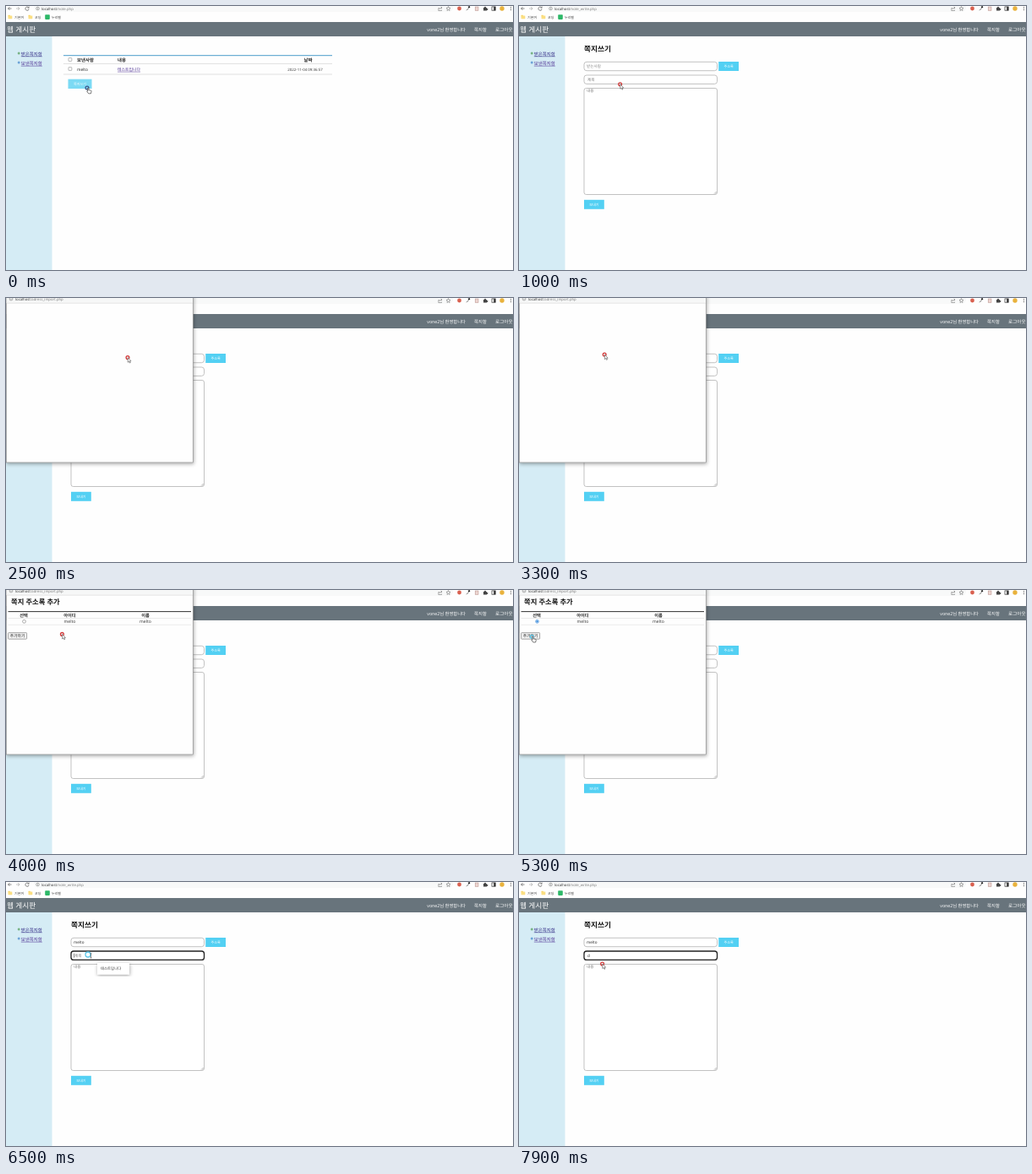
Animation of 600 by 313 pixels, one loop 8000 ms. Source, as an HTML page:

```html
<!DOCTYPE html>
<html lang="ko">
<head>
<meta charset="utf-8">
<title>웹 게시판</title>
<style>
html, body { margin: 0; width: 100%; height: 100%; overflow: hidden; background: #fff; }
svg { display: block; width: 100vw; height: 100vh; }
text {
  font-family: "Open Sans", "Noto Sans CJK KR", "Noto Sans CJK", sans-serif;
  text-rendering: geometricPrecision;
  white-space: pre;
}
</style>
</head>
<body>
<svg id="stage" viewBox="0 0 600 313">
  <defs>
    <filter id="shade" x="-10%" y="-10%" width="125%" height="125%">
      <feDropShadow dx="0.5" dy="1.5" stdDeviation="2" flood-color="#000" flood-opacity=".35"/>
    </filter>
  </defs>
</svg>
<script>
const NS = 'http://www.w3.org/2000/svg';
const LOOP = 8000, STEP = 100;
const SENDER = 'melto', READER = 'vone2';
const stage = document.getElementById('stage');

function add(parent, tag, attrs = {}) {
  const el = document.createElementNS(NS, tag);
  for (const k in attrs) el.setAttribute(k, attrs[k]);
  parent.appendChild(el);
  return el;
}
const group = (parent, attrs) => add(parent, 'g', attrs);
const rect = (p, x, y, width, height, fill, more) => add(p, 'rect', { x, y, width, height, fill, ...more });
const dot = (p, cx, cy, r, fill, more) => add(p, 'circle', { cx, cy, r, fill, ...more });
const path = (p, d, stroke, width = .7, fill = 'none') =>
  add(p, 'path', { d, stroke, fill, 'stroke-width': width });
function text(p, x, y, size, str, fill = '#222', more) {
  const el = add(p, 'text', { x, y, fill, 'font-size': size, ...more });
  el.textContent = str;
  return el;
}
const MID = { 'text-anchor': 'middle' };
const BOLD = { 'font-weight': 700 };
const LINK = { 'text-decoration': 'underline' };
const show = (el, on) => el.setAttribute('display', on ? 'inline' : 'none');

function button(p, x, y, w, h, label, fill) {
  rect(p, x, y, w, h, fill);
  text(p, x + w / 2, y + h / 2 + 1.5, 4.1, label, '#fff', MID);
}

function address(p, x, y, size, file) {
  const el = text(p, x, y, size, 'localhost', '#333');
  const rest = add(el, 'tspan', { fill: '#777' });
  rest.textContent = file;
  return rest;
}

// Browser bars
rect(stage, 0, 0, 600, 313, '#fefefe');
const bar = group(stage);
rect(bar, 33, -3, 496, 10, '#f8f9f9', { rx: 5 });
path(bar, 'M6.5 3H2.5M4.3 1.2L2.5 3l1.8 1.8', '#555');
path(bar, 'M12 3h4M14.2 1.2L16 3l-1.8 1.8', '#aaa');
path(bar, 'M26.6 1.7A2.1 2.1 0 1 0 27.1 3.6M27.1 .6V2.2H25.5', '#555');
dot(bar, 37.5, 3, 1.8, 'none', { stroke: '#666', 'stroke-width': .5 });
path(bar, 'M37.5 2.6V4M37.5 1.7V2.1', '#666', .5);
const file = address(bar, 42, 4.6, 4.3, '/note.php');
path(bar, 'M513 2.5H511.8V5.5H515.5V4.5M513 4Q513.3 2 516 2M514.8 .8L516 2l-1.2 1.2', '#777', .6);
path(bar, 'M523.5 .6l.7 1.6 1.8.2-1.3 1.2.3 1.8-1.5-.9-1.5.9.3-1.8-1.3-1.2 1.8-.2z', '#555', .5);
dot(bar, 536.5, 3, 2.4, '#d9604f');
path(bar, 'M545 5.2L547.6 2.6', '#777', 1);
path(bar, 'M547 1.6L549 .9', '#222', 1.9);
rect(bar, 555.2, 1, 3.8, 4.4, '#ecd5d0', { stroke: '#b58d88', 'stroke-width': .5 });
path(bar, 'M565 2h1.2a.9.9 0 1 1 1.6 0H569v1.2a.9.9 0 1 1 0 1.5V5.6H565z', 'none', 0, '#444');
rect(bar, 575, .9, 4.2, 4.3, '#fff', { stroke: '#333', 'stroke-width': .7 });
rect(bar, 577.2, .9, 2, 4.3, '#333');
dot(bar, 587, 3, 2.7, '#e9b23c');
for (const y of [1.2, 3, 4.8]) dot(bar, 597.5, y, .5, '#444');

for (const x of [2.5, 26.5]) {
  rect(bar, x, 10.8, 2.4, 1.5, '#f5cf58');
  rect(bar, x, 11.4, 4.8, 3.8, '#fbdf83', { rx: .4 });
}
text(bar, 10, 14.8, 4, '기본꺼', '#444');
text(bar, 34, 14.8, 4, '코딩', '#444');
rect(bar, 46.2, 10.3, 5.6, 5.6, '#2db868', { rx: .8 });
text(bar, 54, 14.8, 4, '누리벨', '#444');

// Site frame
rect(stage, 0, 19, 600, 17, '#68747c');
text(stage, 1, 31, 8.7, '웹 게시판', '#fff');
text(stage, 544, 29.8, 5.3, READER + '님 환영합니다', '#fff', { 'text-anchor': 'end' });
text(stage, 554, 29.8, 5.4, '쪽지함', '#fff');
text(stage, 579, 29.8, 5.6, '로그아웃', '#fff');
rect(stage, 0, 36, 54.5, 277, '#d5ecf5');
[['받은쪽지함', 58.6, '#79b486', '#2b2380'], ['보낸쪽지함', 69.8, '#6fa5d8', '#4a2c90']].forEach(([name, y, mark, ink]) => {
  dot(stage, 15.2, y - 2.7, 1.5, mark);
  text(stage, 17.8, y, 5.45, name, ink, LINK);
});

// Inbox page
const inbox = group(stage);
path(inbox, 'M68 58.7H386', '#4a9ccb', 1);
path(inbox, 'M68 68.4H386M68 81H386', '#ccc', .6);
for (const y of [61.6, 72.6])
  rect(inbox, 74, y, 3.8, 3.8, '#fff', { rx: .6, stroke: '#777', 'stroke-width': .5 });
text(inbox, 84, 65.8, 5.4, '보낸사람', '#222', BOLD);
text(inbox, 132, 65.8, 5.4, '내용', '#222', BOLD);
text(inbox, 357.5, 65.8, 5.4, '날짜', '#222', { ...BOLD, ...MID });
text(inbox, 84, 76.8, 4.8, SENDER);
text(inbox, 132, 76.8, 4.9, '테스트입니다', '#4a2c90', LINK);
text(inbox, 354, 76.8, 4.4, '2022-11-04 09:36:57', '#333', MID);
button(inbox, 73.5, 86.7, 28, 11.3, '쪽지쓰기', '#7cdaf4');

// Compose page
const compose = group(stage);
const box = (y, h, rx) =>
  rect(compose, 77, y, 157.5, h, '#fff', { rx, stroke: '#aaa', 'stroke-width': .7 });
text(compose, 77, 54, 8.7, '쪽지쓰기', '#111', BOLD);
box(66.3, 10.4, 3);
const title = box(82, 10.4, 3);
box(97.5, 126, 2.5);
path(compose, 'M231 222.6L233.6 220M232.6 222.6L233.6 221.6', '#777', .5);
const to = text(compose, 80, 73.1, 4.6, '받는사람', '#888');
const subject = text(compose, 81, 88.7, 4.6, '제목', '#777');
text(compose, 80, 102, 4.6, '내용', '#777');
const caret = path(compose, 'M80.5 84.7V89.7', '#222', .5);
button(compose, 236.2, 66, 23.8, 11, '주소록', '#53d0f3');
button(compose, 77, 229.8, 23.8, 11, '보내기', '#53d0f3');
const hint = group(compose);
rect(hint, 108, 96, 38, 13.5, '#fff', { filter: 'url(#shade)' });
text(hint, 112, 104, 4.4, '테스트입니다', '#333');

// Address book window
const popup = group(stage);
rect(popup, .3, -4, 221, 199, '#fefefe', { stroke: '#888', 'stroke-width': .7, filter: 'url(#shade)' });
rect(popup, .6, -4, 220.4, 10, '#f6f7f7');
path(popup, 'M.6 6.2H221', '#ccc', .5);
dot(popup, 6, 1, 1.9, 'none', { stroke: '#666', 'stroke-width': .5 });
path(popup, 'M6 .6V2', '#666', .5);
address(popup, 11, 2.8, 4.25, '/adress_import.php');
const book = group(popup);
text(book, 6, 17, 8.3, '쪽지 주소록 추가', '#111', BOLD);
path(book, 'M2.5 25.6H219', '#333', 1);
path(book, 'M2.5 33.5H219M2.5 41.3H219', '#ddd', .6);
[['선택', 21], ['아이디', 75.5], ['이름', 165]].forEach(([name, x]) =>
  text(book, x, 31.6, 5.2, name, '#222', { ...BOLD, ...MID }));
for (const x of [75.5, 165]) text(book, x, 39.3, 5.1, SENDER, '#333', MID);
const radio = dot(book, 21.5, 37.3, 1.9, '#fff', { 'stroke-width': .6 });
const picked = dot(book, 21.5, 37.3, 1.1, '#1a78d6');
rect(book, 2.6, 50.6, 22, 7.6, '#efefef', { rx: .8, stroke: '#767676', 'stroke-width': .6 });
text(book, 13.6, 56.2, 4.8, '추가하기', '#222', MID);

// Pointer
const pointer = group(stage);
const ring = dot(pointer, 0, 0, 2, 'none', { 'stroke-width': 1.3 });
const shapes = {
  arrow: path(pointer, 'M.2 0V5.6L1.5 4.5 2.4 6.4 3.3 6 2.4 4.2H4z', '#333', .5, '#fff'),
  hand: path(pointer, 'M.6 .2Q1.3-.4 1.8.3V2.6L4.6 3.2Q5.2 3.5 5 4.5L4.4 6.8H1.6L-.3 4.2Q-.2 3.3.7 4z', '#222', .6, '#fff'),
  beam: path(pointer, 'M2.5-1.2H4.5M3.5-1.2V4M2.5 4H4.5', '#444', .6)
};

// time, x, y of the pointer tip
const route = [
  [0, 96, 97], [200, 96, 97], [800, 112, 94], [900, 112, 94], [1600, 250, 71.5], [1900, 250, 71.5],
  [2500, 144, 70.6], [2600, 144, 70.6], [3500, 95, 66.5], [4000, 66.4, 52.4], [4100, 66.4, 52.4],
  [4800, 20.5, 37], [5000, 20.5, 37], [5300, 15.2, 55.2], [5900, 15.2, 55.2], [6400, 97, 86],
  [6800, 97, 86], [7500, 98.6, 97], [LOOP, 98.6, 97]
];

function place(t) {
  const i = route.findIndex(k => k[0] > t);
  const [t0, x0, y0] = route[i - 1], [t1, x1, y1] = route[i];
  const u = (t - t0) / (t1 - t0), e = u * u * (3 - 2 * u);
  return [x0 + (x1 - x0) * e, y0 + (y1 - y0) * e];
}
const within = (t, a, b) => t >= a && t < b;

function draw(t) {
  const writing = t >= 300;
  show(inbox, !writing);
  show(compose, writing);
  file.textContent = writing ? '/note_write.php' : '/note.php';

  const fading = within(t, 1800, 1900) || within(t, 5500, 5600);
  show(popup, within(t, 1800, 5600));
  popup.setAttribute('opacity', fading ? .68 : 1);
  popup.setAttribute('transform', fading ? 'translate(111 90) scale(.986) translate(-111 -90)' : '');
  show(book, t >= 3600);
  show(picked, t >= 4900);
  radio.setAttribute('stroke', t >= 4900 ? '#1a78d6' : '#777');

  const filled = t >= 5600, focus = t >= 6400, typed = t >= 7900;
  to.textContent = filled ? SENDER : '받는사람';
  to.setAttribute('fill', filled ? '#222' : '#888');
  title.setAttribute('stroke', focus ? '#222' : '#aaa');
  title.setAttribute('stroke-width', focus ? 1.3 : .7);
  subject.textContent = typed ? 'd' : '제목';
  subject.setAttribute('fill', typed ? '#222' : '#777');
  show(caret, focus && !typed && (t - 6400) % 1000 < 500);
  show(hint, within(t, 6500, 7200));

  const hand = t < 300 || within(t, 1500, 2000) || within(t, 5200, 5600);
  const beam = within(t, 6300, 7300);
  const kind = hand ? 'hand' : beam ? 'beam' : 'arrow';
  for (const k in shapes) show(shapes[k], k === kind);
  show(ring, !within(t, 1500, 2000));
  ring.setAttribute('r', beam ? 3 : 1.9);
  ring.setAttribute('stroke', t < 300 ? '#3c5590' : hand || beam ? '#5cc6e8' : '#d23c3c');
  pointer.setAttribute('transform', `translate(${place(t)})`);
}

function tick() {
  const t = performance.now() % LOOP;
  draw(Math.floor(t / STEP) * STEP);
  requestAnimationFrame(tick);
}
tick();
</script>
</body>
</html>
```
